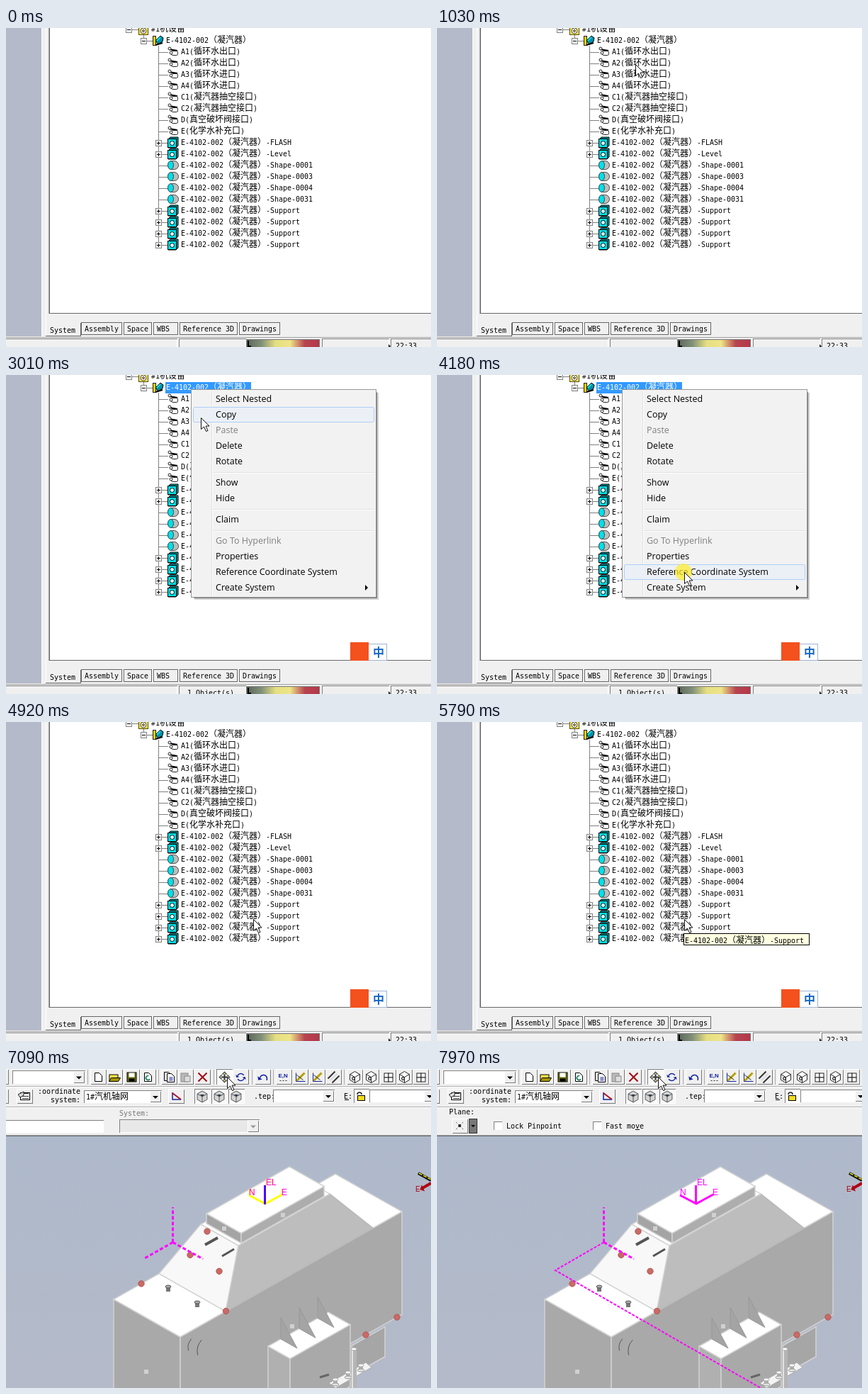
These frames come from a looping animation (600 px wide and 450 px high, 8 s). An HTML page with a canvas:

```html
<!DOCTYPE html>
<html lang="en">
<head>
<meta charset="utf-8">
<style>
html, body { margin: 0; width: 100%; height: 100%; overflow: hidden; }
canvas { display: block; }
</style>
</head>
<body>
<canvas id="stage" width="600" height="450"></canvas>
<script>
const c = document.getElementById('stage').getContext('2d');
const LOOP = 8000;
const MONO = "9.97px 'DejaVu Sans Mono', monospace";
const CJK = "12px 'Noto Sans CJK SC', 'Noto Sans CJK', sans-serif";
const SANS = "12px 'Liberation Sans', sans-serif";
const MENU = "12.5px 'Open Sans', sans-serif";
const FACE = '#f0f0f0', MAGENTA = '#ff00ff', CYAN = '#00e0e8', NAVY = '#1020a0';

/* Drawing helpers; paths are lists of [x, y] */
function rect(x, y, w, h, color) {
  c.fillStyle = color;
  c.fillRect(x, y, w, h);
}
function frame(x, y, w, h, edge, fill) {
  rect(x, y, w, h, edge);
  rect(x + 1, y + 1, w - 2, h - 2, fill);
}
function stroke(color, width = 1, dash = []) {
  c.strokeStyle = color;
  c.lineWidth = width;
  c.setLineDash(dash);
  c.stroke();
  c.setLineDash([]);
}
function trace(points) {
  c.beginPath();
  points.forEach(p => c.lineTo(...p));
}
function line(points, ...style) {
  trace(points);
  stroke(...style);
}
function poly(points, fill, edge, width) {
  trace(points);
  c.closePath();
  c.fillStyle = fill;
  c.fill();
  if (edge) stroke(edge, width);
}
function disc(x, y, r, fill, edge, ry = r) {
  c.beginPath();
  c.ellipse(x, y, r, ry, 0, 0, 7);
  c.fillStyle = fill;
  c.fill();
  if (edge) stroke(edge);
}
function arc(x, y, r, from, to, ...style) {
  c.beginPath();
  c.arc(x, y, r, from, to);
  stroke(...style);
}
function arrow(x, y, size, angle, color) {
  at(x, y, () => {
    c.rotate(angle);
    poly([[0, -size], [size, 0], [0, size]], color);
  });
}
function at(x, y, draw) {
  c.save();
  c.translate(x, y);
  draw();
  c.restore();
}
function label(s, x, y, color, font) {
  c.fillStyle = color;
  c.font = font;
  c.fillText(s, x, y);
}
// Latin runs are half the width of the Chinese runs.
function text(s, x, y, color = '#000') {
  for (const run of s.match(/[\x20-\x7e]+|[^\x20-\x7e]+/g)) {
    label(run, x, y + 4, color, run.charCodeAt(0) < 127 ? MONO : CJK);
    x += c.measureText(run).width;
  }
}
function bevel(x, y, w, h, sunk, fill = FACE) {
  rect(x, y, w, h, sunk ? '#808080' : '#fff');
  rect(x + 1, y + 1, w - 1, h - 1, sunk ? '#fff' : '#777');
  rect(x + 1, y + 1, w - 2, h - 2, fill);
}
function combo(x, y, w, h, off) {
  bevel(x, y, w, h, true, off ? '#e8e8e8' : '#fff');
  bevel(x + w - 17, y + 1, 16, h - 2);
  arrow(x + w - 9, y + h / 2 - 1, 4, Math.PI / 2, off ? '#999' : '#000');
}

/* Tree window */
const TAG = 'E-4102-002（凝汽器）', GRAY = '#808080';
function row(kind, names) {
  return names.split(' ').map(name => ({ kind, name }));
}
const rows = [
  ...row('nozzle', 'A1(循环水出口) A2(循环水出口) A3(循环水进口) A4(循环水进口)'),
  ...row('nozzle', 'C1(凝汽器抽空接口) C2(凝汽器抽空接口) D(真空破坏阀接口) E(化学水补充口)'),
  ...row('box', `${TAG}-FLASH ${TAG}-Level`),
  ...row('shape', ['0001', '0003', '0004', '0031'].map(n => `${TAG}-Shape-${n}`).join(' ')),
  ...row('box', Array(4).fill(TAG + '-Support').join(' '))
];
const rowIcons = {
  nozzle() {
    line([[-6, -3], [6, -1]], '#000', 2);
    disc(-5, -4, 2, '#fff', '#222');
    c.beginPath();
    c.roundRect(-2.5, -.5, 9, 6, 2);
    c.fillStyle = '#fff';
    c.fill();
    stroke('#222');
    disc(-3, 2, 2, '#fff', '#222');
  },
  box() {
    poly([[-7, -4], [-4, -7], [7, -7], [7, 5], [4, 8], [-7, 8]], '#008b90', '#000');
    frame(-8, -5, 13, 13, '#000', CYAN);
    disc(-1.5, 1.5, 3, '#e8ffff', '#000');
  },
  shape() {
    c.beginPath();
    c.roundRect(-7.5, -5.5, 15, 12, 6);
    c.fillStyle = '#bdbdbd';
    c.fill();
    stroke('#444');
    disc(-3.5, .5, 4, CYAN, '#444', 6);
  }
};
function expander(x, y, plus) {
  frame(x - 4, y - 4, 9, 9, GRAY, '#fff');
  rect(x - 2, y, 5, 1, '#000');
  if (plus) rect(x, y - 2, 1, 5, '#000');
}
function drawTree(selected) {
  rect(194, 0, 1, 18, GRAY);
  rect(215, 25, 1, 282, GRAY);
  [2, 18].forEach((y, i) => {
    rect(173 + 21 * i, y, 15, 1, GRAY);
    expander(173 + 21 * i, y);
  });
  frame(187, -4, 14, 14, '#540', '#fe5');
  disc(194, 4, 4, '#fff', '#444');
  disc(194, 4, 1.5, '#d8c020', '#444');
  text('#1机设备', 205, 1);

  frame(207, 11, 5, 14, '#222', '#f2d200');
  poly([[211, 18], [218, 11], [222, 14], [221, 19], [215, 23]], '#008fa8', '#000');
  line([[213, 18], [218, 13]], CYAN, 2);
  line([[211, 24], [221, 21]], '#000', 2);
  if (selected) rect(225, 10, 121, 16, '#3399ff');
  text(TAG, 226, 17, selected ? '#fff' : '#000');

  rows.forEach(({ kind, name }, i) => {
    const y = 33 + 16 * i;
    rect(215, y + 1, 14, 1, GRAY);
    if (kind === 'box') expander(215, y + 1, true);
    at(236, y, rowIcons[kind]);
    text(name, 247, y);
  });
}
function drawTabs() {
  let x = 106;
  for (const name of ['Assembly', 'Space', 'WBS', 'Reference 3D', 'Drawings']) {
    const w = Math.max(35, name.length * 6 + 10);
    frame(x, 415, w, 18, '#666', FACE);
    rect(x + 1, 416, 1, 15, '#fff');
    text(name, x + 5, 424);
    x += w + 2;
  }
  frame(56, 410, 50, 25, '#666', FACE);
  rect(56, 404, 50, 12, FACE);
  rect(56, 0, 1, 434, '#fff');
  text('System', 62, 426);
}
function drawStatus(count) {
  rect(0, 436, 600, 1, '#a0a0a0');
  [-2, 244, 446, 543].forEach((x, i) => bevel(x, 438, i ? 95 : 244, 14, true));
  const shade = c.createLinearGradient(340, 0, 442, 0);
  ['#5c665c', '#809078', '#e6df82', '#eee488', '#b84450', '#b43848']
    .forEach((color, i) => shade.addColorStop(i / 5, color));
  frame(339, 439, 104, 13, '#777', shade);
  rect(341, 441, 2, 8, '#000');
  rect(341, 448, 5, 2, '#000');
  if (count) text('1 Object(s)', 256, 448);
  arrow(540, 449, 3, 0, '#222');
  text('22:33', 550, 448);
}
function drawIme() {
  frame(508, 379, 30, 24, '#9fb6d4', '#fff');
  rect(486, 377, 26, 26, '#f4511e');
  label('中', 518, 397, '#1768c4', "bold 16px 'Noto Sans CJK SC', 'Noto Sans CJK', sans-serif");
}

const menuGroups = [
  ['Select Nested', 'Copy', 'Paste', 'Delete', 'Rotate'],
  ['Show', 'Hide'],
  ['Claim'],
  ['Go To Hyperlink', 'Properties', 'Reference Coordinate System', 'Create System']
];
const disabled = ['Paste', 'Go To Hyperlink'];
function drawMenu(alpha, pointerY) {
  c.save();
  c.globalAlpha = alpha;
  rect(266, 25, 260, 292, 'rgba(0,0,0,.18)');
  rect(265, 24, 259, 291, 'rgba(0,0,0,.4)');
  frame(261, 20, 262, 294, '#979797', '#f2f2f2');
  rect(290, 23, 1, 288, '#e0e0e0');
  rect(291, 23, 1, 288, '#fff');
  let y = 34;
  menuGroups.forEach((group, i) => {
    if (i) {
      rect(292, y - 15, 228, 1, '#e0e0e0');
      rect(292, y - 14, 228, 1, '#fff');
    }
    for (const name of group) {
      if (Math.abs(pointerY - y) < 11 && pointerY > 24) {
        c.beginPath();
        c.roundRect(264.5, y - 10.5, 255, 21, 2);
        c.fillStyle = '#ebf0f7';
        c.fill();
        stroke('#aecff7');
      }
      label(name, 296, y + 4, disabled.includes(name) ? '#808080' : '#000', MENU);
      y += 22;
    }
    y += 8;
  });
  arrow(507, 300, 4, 0, '#000');
  c.restore();
}
function drawTreeScene(t, pointer) {
  rect(0, 0, 600, 450, FACE);
  rect(0, 0, 50, 435, '#b4bac9');
  rect(50, 0, 1, 436, '#fff');
  rect(60, 0, 1, 403, '#a0a0a0');
  rect(61, 0, 539, 403, '#696969');
  rect(62, 0, 538, 402, '#fff');
  drawTree(t >= 1440 && t < 4850);
  drawTabs();
  const busy = t >= 5000 && t < 5330;
  drawStatus(t >= 2000 && !busy);
  if (t >= 1580 && !busy) drawIme();
  const fade = Math.min((t - 2260) / 280, (4990 - t) / 280, 1);
  if (t >= 2330 && t < 4920) drawMenu(fade, pointer[1]);
  if (t >= 5790) {
    frame(348, 298, 178, 17, '#000', '#ffffe1');
    text(TAG + '-Support', 350, 308);
  }
}

/* Toolbar */
function page(x = 0, y = 0, fill = '#fff') {
  poly([[x - 5, y - 6], [x + 1, y - 6], [x + 5, y - 2], [x + 5, y + 6], [x - 5, y + 6]], fill, '#000');
}
function crossArrows(fill) {
  for (let i = 0; i < 4; i++) {
    const a = i * Math.PI / 2;
    line([[0, 0], [5 * Math.cos(a), 5 * Math.sin(a)]], '#333', 2);
    arrow(4 * Math.cos(a), 4 * Math.sin(a), 4, a, '#333');
    arrow(4 * Math.cos(a), 4 * Math.sin(a), 2.5, a, fill);
  }
}
function hexagon(r) {
  return Array.from({ length: 6 }, (_, i) => [r * Math.sin(i * Math.PI / 3), -r * Math.cos(i * Math.PI / 3)]);
}
function cube(fill, edge) {
  const corners = hexagon(8);
  poly(corners, fill, edge);
  [1, 3, 5].forEach(i => line([[0, 0], corners[i]], edge));
}
const icons = {
  page,
  folder() {
    frame(-8, -4, 13, 10, '#000', '#ffe94a');
    poly([[-5, 1], [8, 1], [5, 6], [-8, 6]], '#a89600', '#000');
  },
  disk() {
    frame(-7, -7, 14, 14, '#000', '#6b6b10');
    rect(-4, -6, 8, 6, '#fff');
    rect(-4, 2, 8, 4, '#000');
  },
  reload() {
    page();
    arc(0, 1, 3, .6, 5, '#075', 1.5);
  },
  copy() {
    page(-2, -1);
    page(2, 1);
    [0, 2, 4].forEach(y => rect(0, y, 5, 1, NAVY));
  },
  paste() {
    frame(-7, -6, 11, 13, '#888', '#bbb');
    frame(-2, -2, 9, 9, '#888', '#ddd');
  },
  remove() {
    [-6, 6].forEach(y => line([[-6, y], [6, -y]], '#a00010', 2));
  },
  move() { crossArrows('#ffea00'); },
  rotate() {
    [0, Math.PI].forEach(a => {
      arc(0, 0, 5, a + .4, a + 2.6, NAVY, 1.5);
      arrow(5 * Math.cos(a + .4), 5 * Math.sin(a + .4), 3, a - 1, NAVY);
    });
  },
  undo() {
    arc(1, 2, 5, 3.3, 6.8, NAVY, 1.6);
    arrow(-4, 1, 4, 2.2, NAVY);
  },
  points() {
    label('E,N', -8, 0, NAVY, "bold 8px 'Liberation Sans', sans-serif");
    line([[-6, 5], [6, 5]], '#333', 1, [2, 2]);
  },
  sketch() {
    line([[-6, -6], [-6, 6], [7, 6]], NAVY);
    line([[-5, 5], [6, -6]], '#b8a000', 3);
    line([[-5, -3], [4, 4]], '#222');
  },
  parallel() {
    [-3, 0, 3].forEach(d => line([[d - 5, d + 5], [d + 5, d - 5]], d ? '#333' : '#ddd', 2));
  },
  solid() {
    cube('#fff', '#222');
    disc(-2, 2, 2, '#ccc', '#000');
  },
  grid() {
    [-6, 0].forEach(x => [-6, 0].forEach(y => frame(x, y, 7, 7, '#222', '#fff')));
  }
};
const toolGroups = {
  130: 'page folder disk reload', 230: 'copy paste remove', 308: 'move rotate',
  362: 'undo', 392: 'points sketch sketch parallel', 492: 'solid solid grid solid grid'
};
function drawTools(pressed) {
  for (const [start, names] of Object.entries(toolGroups)) {
    rect(start - 15, 1, 1, 21, '#aaa');
    names.split(' ').forEach((name, i) => {
      const x = Math.round(+start + 23.3 * i), down = pressed && name === 'move';
      bevel(x - 11, 0, 23, 22, down, down ? '#fafafa' : FACE);
      at(x + .5, 11.5, () => down ? crossArrows('#c8c8a0') : icons[name]());
    });
  }
}
function drawCoordinateRow() {
  bevel(-10, 28, 14, 21);
  bevel(15, 28, 23, 21);
  frame(20, 33, 14, 11, '#000', '#fff');
  [34, 38, 41].forEach(y => rect(23, y, 9, 1, '#333'));
  poly([[17, 36], [25, 32], [25, 37], [20, 40]], '#ddd', '#222');
  text(':oordinate', 45, 31);
  text('system:', 63, 43);
  combo(110, 30, 110, 18);
  text('1#汽机轴网', 113, 39);
  bevel(229, 28, 23, 21);
  line([[235, 33], [235, 43], [247, 43]], NAVY, 1.5);
  line([[235, 34], [247, 43]], '#b01020', 2);
  [277, 301, 325].forEach(x => {
    bevel(x - 11, 28, 23, 21, true, '#f8f8f8');
    at(x, 39, () => cube('#d4d4d4', '#555'));
    arrow(x, 36, 3, Math.PI / 2, '#234');
  });
  text('.tep:', 350, 38);
  combo(377, 29, 87, 18);
  text('E:', 477, 38);
  rect(478, 43, 6, 1, '#000');
  bevel(491, 28, 22, 20, true, '#fff');
  frame(496, 37, 11, 8, '#000', '#f4dc20');
  arc(499, 36, 3, Math.PI, 0, '#222', 1.5);
  combo(513, 29, 94, 18);
}
function drawMoveRow() {
  text('Plane:', 17, 60);
  bevel(21, 70, 23, 21);
  [-5, 5].forEach(d => line([[27, 80 - d], [37, 80 + d]], '#555', 1, [2, 2]));
  disc(32, 80, 2, '#222');
  frame(45, 70, 12, 21, '#333', '#777');
  arrow(51, 79, 3, Math.PI / 2, '#000');
  ['Lock Pinpoint', 'Fast move'].forEach((name, i) => {
    bevel(80 + 140 * i, 74, 12, 12, true, '#fff');
    text(name, 98 + 140 * i, 80);
  });
  rect(280, 85, 6, 1, '#000');
}
function drawToolbar(t) {
  rect(0, 0, 600, 95, FACE);
  [24, 53].forEach(y => {
    rect(0, y, 600, 1, '#b0b0b0');
    rect(0, y + 1, 600, 1, '#fff');
  });
  bevel(-10, 0, 14, 22);
  combo(9, 2, 103, 19);
  drawTools(t >= 7090);
  drawCoordinateRow();
  if (t >= 7290) drawMoveRow();
  else {
    bevel(-4, 72, 142, 18, true, '#fff');
    text('System:', 160, 62, '#777');
    combo(160, 71, 198, 19, true);
  }
  rect(0, 93, 600, 1, '#a0a0a0');
  rect(0, 94, 600, 1, '#696969');
}

/* Model window: a runs up-left, b up-right, z up from the near corner */
const EDGE = '#d2d2d2', SIDE = '#a9a9a9';
function iso(a, b, z = 0) {
  return [246 + b - a, 378 - .565 * (a + b) - z];
}
function face(corners, fill, edge = EDGE, width = 1.5) {
  poly(corners.map(p => iso(...p)), fill, edge, width);
}
function block([a0, a1], [b0, b1], [z0, z1], left = SIDE, right = SIDE) {
  face([[a0, b0, z0], [a1, b0, z0], [a1, b0, z1], [a0, b0, z1]], left);
  face([[a0, b0, z0], [a0, b1, z0], [a0, b1, z1], [a0, b0, z1]], right);
  face([[a0, b0, z1], [a1, b0, z1], [a1, b1, z1], [a0, b1, z1]], '#fff');
}
function drawPumps() {
  poly([[456, 443], [508, 414], [516, 421], [465, 450]], '#f4f4f4', '#aaa');
  for (let i = 0; i < 3; i++) {
    const x = 465 + 18 * i, y = 438 - 10 * i;
    rect(x - 3, y, 6, 7, '#b0b0b0');
    disc(x, y, 4, '#fff', '#aaa', 2);
    disc(x, y + 7, 5, '#e4e4e4', '#999', 2);
  }
  rect(487, 395, 8, 55, '#b5b5b5');
  rect(488, 395, 2, 55, '#e2e2e2');
  disc(491, 395, 4, '#fff', '#aaa', 2);
  line([[443, 435], [456, 431]], '#666', 3);
}
function drawModel() {
  const sky = c.createLinearGradient(0, 95, 0, 450);
  sky.addColorStop(0, '#aeb9cb');
  sky.addColorStop(1, '#b4bac9');
  rect(0, 95, 600, 355, sky);

  face([[0, 242, -149], [0, 289, -149], [0, 289, -191], [0, 250, -191]], '#a6a6a6');
  block([0, 94], [0, 313], [-145, 0]);
  face([[0, 64], [20, 102, 60], [20, 231, 60], [0, 272]], '#bdbdbd', '#b9b9b9');
  face([[20, 102, 60], [73, 102, 60], [73, 231, 60], [20, 231, 60]], '#fff');
  face([[0, 64], [94, 64], [73, 102, 60], [20, 102, 60]], '#f8f8f8');
  block([21, 70], [107, 224], [60, 74], '#a4a4a4', '#adadad');
  block([-40, -9], [115, 200], [-160, -73], '#b0b0b0');
  for (let b = 133; b < 190; b += 26) {
    face([[-9, b, -73], [-9, b, -43], [-32, b, -73]], '#a4a4a4', '#989898', 1);
  }
  drawPumps();

  [0, 1].forEach(i => {
    line([[281 + 24 * i, 248 + 16 * i], [299 + 23 * i, 238 + 16 * i]], '#555', 4 - i);
    const x = 229 + 41 * i, y = 309 + 22 * i;
    rect(x - 3, y - 2, 6, 7, '#777');
    disc(x, y - 2, 4, '#aaa', '#555', 2);
    arc(275 + 18 * i, 393 + 5 * i, 18 + 5 * i, 2.9, 3.9, '#555');
  });
  [[308, 225], [391, 206], [404, 363], [198, 427]].forEach(([x, y]) => rect(x - 3, y - 3, 6, 6, '#d0d0d0'));
  const joints = [[94, 39], [0, 64.5], [0, 262, -145], [0, 306, -145], [65, 103, 54], [67, 81, 32], [28, 83, 30]];
  joints.forEach(p => disc(...iso(...p), 4.2, '#c96a65', '#b05a55'));

  line([[582, 147], [600, 157]], '#111', 4);
  line([[583, 147], [600, 156]], '#e8e000', 1.5, [5, 2]);
  arrow(589, 168, 5, 2.7, '#b00010');
  line([[588, 168], [600, 161]], '#b00010', 4);
  label('E', 578, 173, '#b00010', "10px 'Liberation Sans', sans-serif");
}
function drawAxes(t) {
  const origin = [235.5, 244.5];
  [[235.5, 195], [278, 268]].forEach(end => line([origin, end], MAGENTA, 3, [5, 3]));
  if (t >= 7290) line([origin, [167, 284], [457, 450]], MAGENTA, 2, [4, 2]);
  else line([origin, [194, 268]], MAGENTA, 3, [5, 3]);

  const active = t >= 7970;
  line([[343, 178], [366, 190], [390, 177]], active ? MAGENTA : '#ffff00', 3);
  line([[365.5, 191], [365.5, 164]], active ? MAGENTA : '#4a00ff', 3);
  [['EL', 367, 164], ['N', 343, 178], ['E', 389, 178]].forEach(([s, x, y]) => {
    if (!active) label(s, x - 1, y, '#ffff00', SANS);
    label(s, x, y, MAGENTA, SANS);
  });
}

/* Pointer */
const moves = [
  { start: 0, end: 270, to: [407, 265] },
  { start: 540, end: 1170, to: [262, 21] },
  { start: 2940, end: 3010, to: [275, 60] },
  { start: 3010, end: 3780, to: [349, 278] },
  { start: 5990, end: 5990, to: [327, 83] },
  { start: 6120, end: 6820, to: [312, 11] }
];
function pointerAt(t) {
  let pos = [533, 448];
  for (const { start, end, to } of moves) {
    if (t < start) break;
    const p = t >= end ? 1 : (t - start) / (end - start);
    const k = p * p * (3 - 2 * p);
    pos = pos.map((v, i) => Math.round(v + (to[i] - v) * k));
  }
  return pos;
}
function drawPointer(x, y, clicked) {
  if (clicked) disc(x - 1, y, 12, 'rgba(255,236,40,.72)');
  at(x + .5, y + .5, () =>
    poly([[0, 0], [0, 16], [4, 12.5], [7, 19], [9.5, 18], [6.5, 11.5], [11.5, 11.5]], '#fff', '#111'));
}

function render() {
  const t = performance.now() % LOOP;
  const pointer = pointerAt(t);
  if (t < 5990) drawTreeScene(t, pointer);
  else {
    drawModel();
    drawAxes(t);
    drawToolbar(t);
  }
  const clicked = (t >= 1370 && t < 1780) || (t >= 4180 && t < 4710);
  if (t >= 70) drawPointer(...pointer, clicked);
  requestAnimationFrame(render);
}
render();
</script>
</body>
</html>
```
